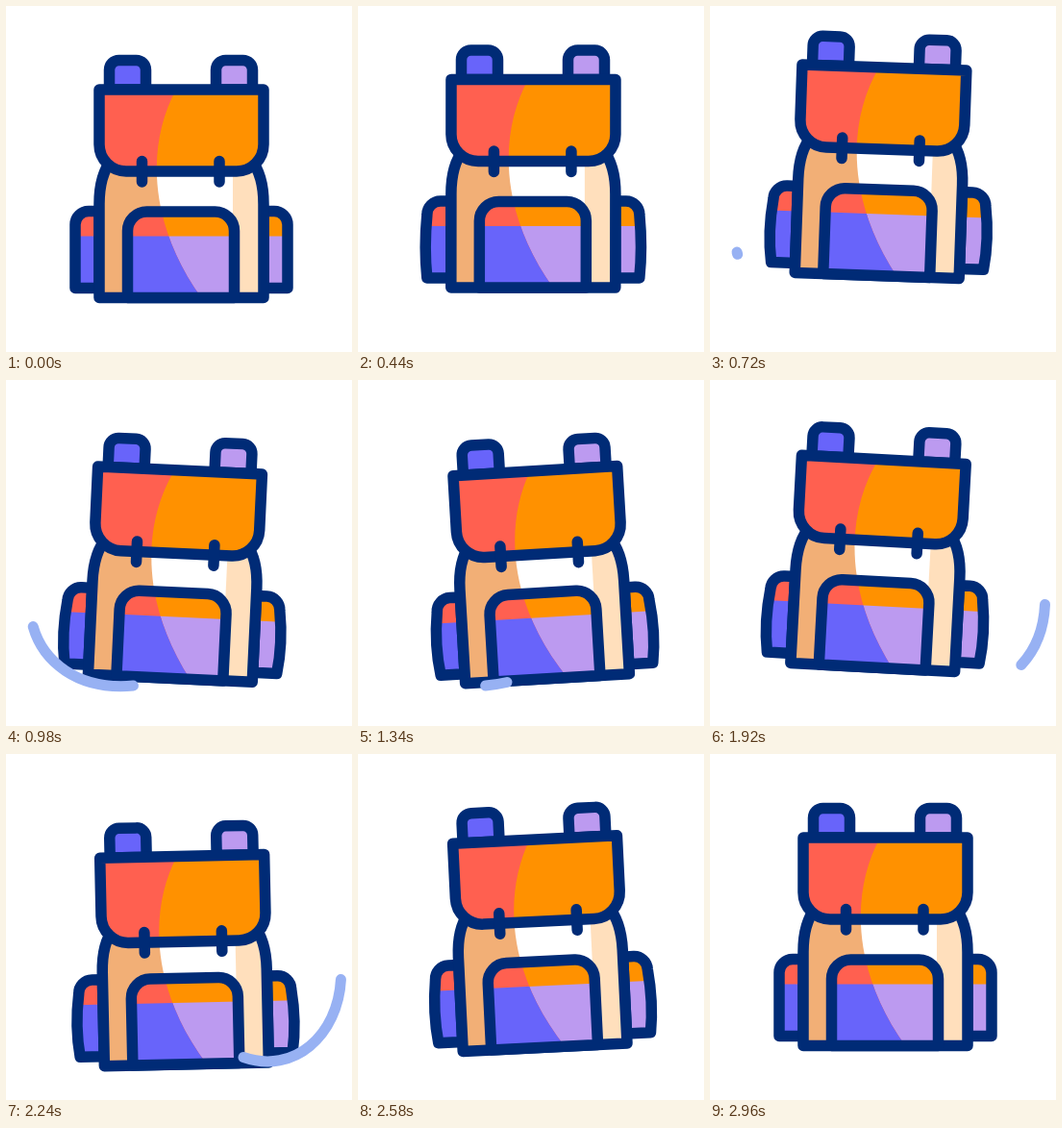
Write an HTML page with a canvas that moves like this. It is 360 by 360 pixels and loops after 3.34 s.

```html
<!DOCTYPE html>
<html lang="en">
<head>
<meta charset="utf-8">
<title>Backpack</title>
<style>
html, body { margin: 0; background: #fff; overflow: hidden; }
canvas { display: block; width: 360px; height: 360px; }
</style>
</head>
<body>
<canvas id="stage" width="360" height="360"></canvas>
<script>
const ctx = document.getElementById('stage').getContext('2d');
const LOOP = 3340;
const NAVY = '#002b76', PURPLE = '#6864fa', LILAC = '#bc9af0', RED = '#ff6050',
      ORANGE = '#ff9100', TAN = '#f2af76', CREAM = '#ffdfbc', TRAIL = '#97b1f3';

const path = d => new Path2D(d);
const shade = path('M0 0H177V87C148 140 145 222 203.5 304H0Z');
const straps = [107.5, 218.5].map(x => path(`M${x} 87V66.5a10 10 0 0 1 10-10h18a10 10 0 0 1 10 10V87Z`));
const body = path('M110 160Q97 176 97 206V303.5H268V206Q268 176 255 160Z');
const pocket = path('M126.5 303.5V234a20 20 0 0 1 20-20H217.5a20 20 0 0 1 20 20V303.5Z');

// Parts that give way while the bag bounces
const sides = bow => [
  path(`M97 213.5H86a14 14 0 0 0-14 14Q${72 - bow} 262 72 293.5H97Z`),
  path(`M268 213.5h11a14 14 0 0 1 14 14Q${293 + bow} 262 293 293.5H268Z`)
];
const flap = drop => path(`M97 87H268V${144 + drop}a28 28 0 0 1-28 28H125a28 28 0 0 1-28-28Z`);
const buckles = drop => path(`M141.5 ${161.5 + drop}v21.5M222 ${161.5 + drop}v21.5`);

const trails = [
  { d: path('M28 256C39 296 82 331 155 314.5'), size: 156, head: [690, 1080], tail: [960, 1470] },
  { d: path('M348.5 233.5C346 292 300 334 247 315.5'), size: 155, head: [1800, 2060], tail: [2230, 2440] }
];

// Turning points as [time, value]
const lift = [[200, 0], [710, -23], [1140, 20], [1700, -23], [2180, 20], [2750, -2.5], [2960, 0]];
const tilt = [[400, 0], [920, 3], [1360, -3.4], [1900, 3.1], [2460, -3.4], [2900, 0]];
const bulge = [[200, 0], [600, 5], [2500, 5], [2900, 0]];

function ease(t, [from, to]) {
  const p = Math.min(1, Math.max(0, (t - from) / (to - from)));
  return (1 - Math.cos(Math.PI * p)) / 2;
}

function track(keys, t) {
  let value = keys[0][1];
  for (let i = 1; i < keys.length; i++) {
    const [a, from] = keys[i - 1], [b, to] = keys[i];
    value += (to - from) * ease(t, [a, b]);
  }
  return value;
}

function band(y, color, width = 360) {
  ctx.fillStyle = color;
  ctx.fillRect(0, y, width, 360);
}

// Each band is [top, shaded colour, lit colour, optional highlight]
function part(shape, ...bands) {
  ctx.save();
  ctx.clip(shape);
  for (const [y, , lit, shine] of bands) {
    band(y, lit);
    if (shine) band(y, shine, 236);
  }
  ctx.clip(shade);
  for (const [y, dark] of bands) band(y, dark);
  ctx.restore();
  ctx.stroke(shape);
}

function drawBag(t) {
  const cloth = [[0, RED, ORANGE], [239.5, PURPLE, LILAC]];
  const rise = track(lift, t);
  const drop = Math.max(0, rise) * 0.2;
  ctx.save();
  ctx.translate(182, 56 + rise);
  ctx.rotate(track(tilt, t) * Math.PI / 180);
  ctx.translate(-182, -56);
  ctx.strokeStyle = NAVY;
  ctx.lineWidth = 11.5;
  for (const s of straps) part(s, [0, PURPLE, LILAC]);
  for (const s of sides(track(bulge, t))) part(s, ...cloth);
  part(body, [0, TAN, CREAM, '#fff']);
  part(pocket, ...cloth);
  part(flap(drop), [0, RED, ORANGE]);
  ctx.stroke(buckles(drop));
  ctx.restore();
}

function drawTrail({ d, size, head, tail }, t) {
  const end = size * ease(t, head), start = size * ease(t, tail);
  if (end - start < 0.5) return;
  ctx.strokeStyle = TRAIL;
  ctx.lineWidth = 11;
  ctx.setLineDash([end - start, 999]);
  ctx.lineDashOffset = -start;
  ctx.stroke(d);
  ctx.setLineDash([]);
}

const origin = performance.now();
function draw() {
  const t = (performance.now() - origin) % LOOP;
  ctx.fillStyle = '#fff';
  ctx.fillRect(0, 0, 360, 360);
  ctx.lineCap = ctx.lineJoin = 'round';
  drawBag(t);
  for (const trail of trails) drawTrail(trail, t);
  requestAnimationFrame(draw);
}
draw();
</script>
</body>
</html>
```
